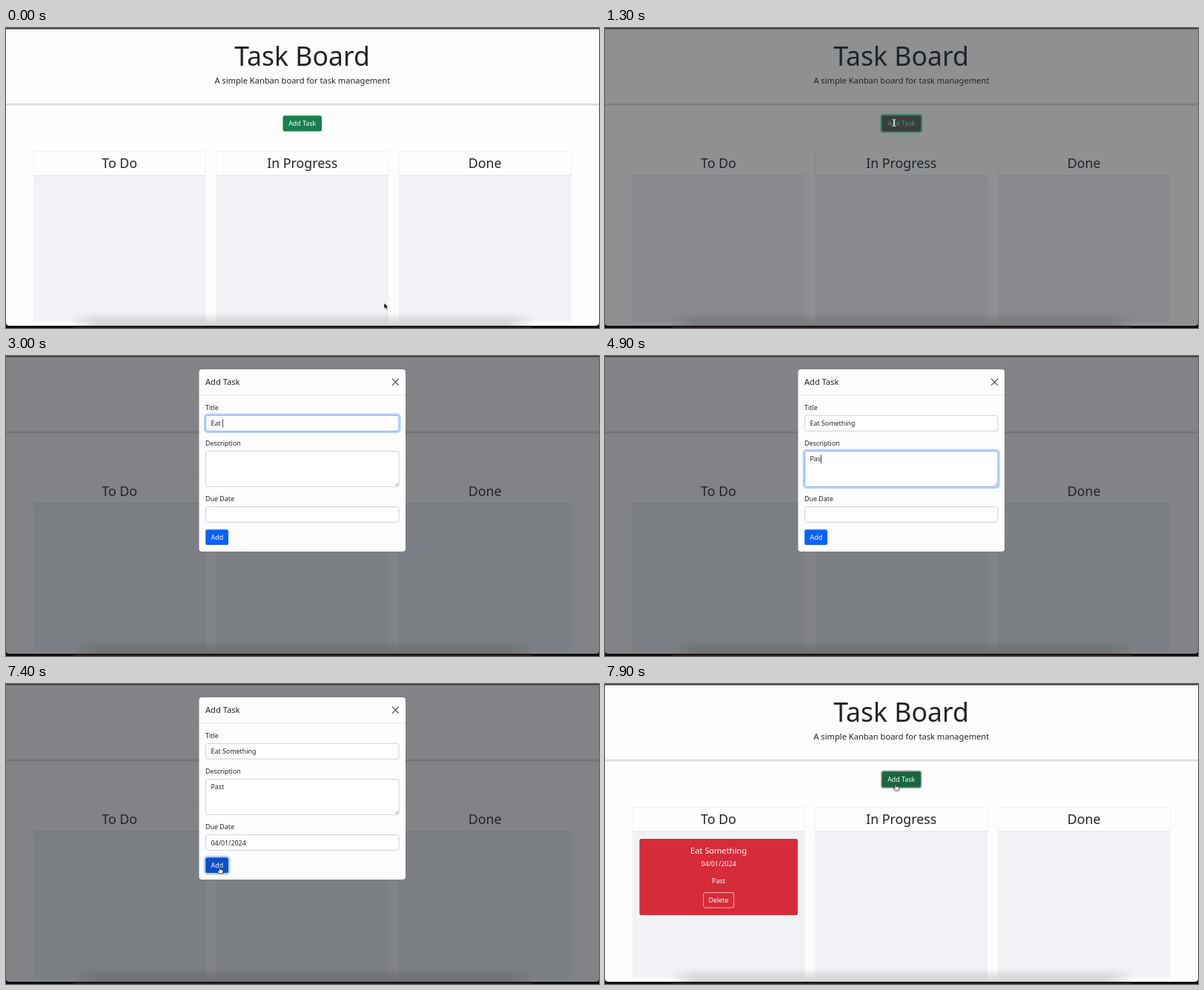
These frames come from a looping animation (800x405 px, 8 s). An HTML page:

```html
<!DOCTYPE html>
<html lang="en">
<head>
<meta charset="utf-8">
<title>Task Board</title>
<style>
  html, body { margin: 0; width: 100%; height: 100%; overflow: hidden; background: #0c0c0c; }
  svg { display: block; width: 800px; height: 405px; font-family: "Noto Sans", sans-serif; font-size: 8.9px; fill: #212529; }
  text { white-space: pre; }
  .mid { text-anchor: middle; }
  .light { fill: #fff; }
  .field { fill: #fff; stroke: #ced1d5; }
  .focused { stroke: #86b0fe; }
  .ring { fill: none; stroke: #0d6efd; stroke-opacity: .3; stroke-width: 2.4; }
  #calendar { font-family: "Liberation Sans", Arial, sans-serif; }
</style>
</head>
<body>
<svg id="stage" viewBox="0 0 800 405"></svg>
<script>
const LOOP = 8000, STEP = 100;
const stage = document.getElementById('stage');

const rect = (x, y, w, h, attrs = '') => `<rect x="${x}" y="${y}" width="${w}" height="${h}" ${attrs}/>`;
const label = (x, y, str, attrs = '') => `<text x="${x}" y="${y}" ${attrs}>${str}</text>`;
const centered = (x, y, str, size = 8.9, cls = '') => label(x, y, str, `class="mid ${cls}" style="font-size:${size}px"`);

const column = (x, name) =>
  rect(x, 166.5, 232.5, 230, 'fill="#f1f2f5"') +
  rect(x, 166.5, 232.5, 33, 'fill="#fdfdfd" stroke="#f1f1f2" stroke-width=".8"') +
  rect(x, 198.8, 232.5, .9, 'fill="#dcdee0"') +
  centered(x + 116.2, 188.5, name, 17.8);

const field = (name, y, h, title) =>
  label(269, y - 7.8, title) +
  `<g id="${name}">` +
  rect(268, y - 1.5, 263.5, h + 3, 'class="ring" rx="4"') +
  rect(269.5, y, 260.5, h, 'class="field" rx="3"') +
  label(276.5, y + 13.9, '') +
  rect(0, y + 5, .8, 11.5, 'class="caret" fill="#111"') + '</g>';

function calendarMarkup() {
  const rights = [291, 312, 332.5, 355.5, 376, 396, 416];
  const lefts = [272.5, 293.5, 316.5, 337.5, 359.5, 380.5, 399.8];
  const widths = [20, 21, 18, 20, 18.5, 18, 18];
  const heads = ['Su', 'Mo', 'Tu', 'We', 'Th', 'Fr', 'Sa'].map((d, i) =>
    label([282, 304, 325, 347, 368.5, 388.7, 408.7][i], 262.3, d, 'class="mid" font-weight="bold"')).join('');
  let days = '';
  for (let day = 1; day <= 30; day++) {
    const col = day % 7, y = 272 + Math.floor(day / 7) * 17.6;
    const look = day === 2 ? 'fill="#fbe483" stroke="#dac254" stroke-dasharray="1.5 1"' : 'fill="#e7e7e7" stroke="#c6c6c6"';
    days += rect(lefts[col], y, widths[col], 15.8, look + ' stroke-width=".8"') +
      label(rights[col], y + 11.2, day, 'text-anchor="end" fill="#444"');
  }
  return rect(269.5, 225.5, 151.5, 136.5, 'fill="#f0f0f0" stroke="#c2c2c2" rx="1.5"') +
    rect(271.5, 227.8, 147, 20.2, 'fill="#e4e4e4" stroke="#d3d3d3" stroke-width=".8" rx="1.5"') +
    [281, 409].map(x => `<circle cx="${x}" cy="237" r="4.2" fill="#333b47"/>`).join('') +
    '<path d="M282 235l-2.5 2 2.5 2z" fill="#fff"/>' +
    [298.5, 347].map((x, i) => rect(x, 231.5, 45, 11.5, 'fill="#fff" stroke="#888" stroke-width=".8"') +
      label(x + 2.5, 240.8, ['Apr', '2024'][i], 'fill="#222"')).join('') + heads + days;
}

stage.innerHTML = `
<defs><linearGradient id="fade" x2="0" y2="1">
  <stop offset="0" stop-color="#000" stop-opacity="0"/><stop offset="1" stop-color="#000" stop-opacity=".17"/>
</linearGradient>
<linearGradient id="sides"><stop offset="0" stop-color="#000"/><stop offset=".06" stop-color="#fff"/>
  <stop offset=".94" stop-color="#fff"/><stop offset="1" stop-color="#000"/></linearGradient>
<mask id="dockMask">${rect(85, 380, 630, 25, 'fill="url(#sides)"')}</mask></defs>
${rect(0, 0, 800, 405, 'fill="#0c0c0c"')}
${rect(90, 403, 620, 2, 'fill="#2a1d20" rx="2"')}
${rect(0, 0, 800, 1.4, 'fill="#333335"')}
<path d="M0 1.4H800V398Q800 402 795 402H5Q0 402 0 398Z" fill="#fdfdfd"/>
${centered(399.5, 50.5, 'Task Board', 35.6)}
${centered(399.8, 75, 'A simple Kanban board for task management', 11.11)}
${rect(0, 101.8, 800, 2.6, 'fill="#d9d9da"')}
<g id="addTask">${rect(372, 116.5, 55.5, 24.5, 'rx="4" fill="#777" opacity=".6" class="glow"')}
${rect(373.5, 118.2, 52.5, 21.2, 'rx="2.6" class="face"')}
${centered(399.7, 132, 'Add Task', 8.9, 'light')}</g>
${column(37, 'To Do')}${column(283.5, 'In Progress')}${column(530, 'Done')}
<g id="card">${rect(46.5, 209, 213.5, 103, 'rx="2.5" fill="#d62b39"')}
${centered(153.2, 229, 'Eat Something', 11.11, 'light')}${centered(153.2, 246.3, '04/01/2024', 8.9, 'light')}
${centered(153.2, 268.7, 'Past', 8.9, 'light')}
${rect(132.8, 281.6, 41, 20.4, 'rx="2.5" fill="none" stroke="#f6d9dc" stroke-width=".8"')}
${centered(153.2, 295.2, 'Delete', 8.9, 'light')}</g>
${rect(85, 383, 630, 19, 'fill="url(#fade)" mask="url(#dockMask)"')}
${rect(0, 1.4, 800, 400.6, 'id="backdrop"')}
<g id="dimButton">${rect(372.5, 117.5, 54.5, 22.8, 'rx="3" fill="#3b3d3c" stroke="#2c8657" stroke-width="1.8"')}
${centered(399.7, 132, 'Add Task', 8.9)}</g>
<g id="modal">${rect(260.5, 18, 278.5, 246, 'rx="4" fill="#fdfdfd"')}
${rect(260.5, 52.3, 278.5, .8, 'fill="#dcdfe2"')}
${label(269, 39.2, 'Add Task', 'style="font-size:11.11px"')}
<path d="M521.3 31l8.4 8.4m0-8.4l-8.4 8.4" stroke="#555" stroke-width="1.2" stroke-linecap="round"/>
${field('titleField', 80.3, 21, 'Title')}
${field('noteField', 128.4, 48, 'Description')}
<path d="M525.3 175.2l3.8-3.8m-1.5 3.8l1.5-1.5" stroke="#666" stroke-width=".7"/>
${field('dateField', 203.6, 20.8, 'Due Date')}
${rect(268, 233, 33.3, 23.2, 'id="addRing" class="ring" rx="4"')}
${rect(269.2, 234.2, 30.8, 20.8, 'id="addFace" rx="2.6"')}
${centered(284.8, 247.7, 'Add', 8.9, 'light')}</g>
<g id="calendar">${calendarMarkup()}</g>
<g id="tip"><path d="M331.5 230l5.5-4.5 5.5 4.5z" fill="#161616"/>
${rect(324.3, 229.5, 87.7, 25, 'rx="4" fill="#161616"')}${label(331.5, 245.5, '04/02/2024', 'class="light" style="font-size:8.3px"')}</g>
<g id="pointer">
<path id="arrow" d="M0 0v8.2l1.9-1.7 1.3 2.9 1.5-.7-1.3-2.7h2.5z" fill="#000" stroke="#fff" stroke-width=".7"/>
<path id="hand" d="M-.8 0q.8-.9 1.6 0v3.2l3.4.8q1 .4.8 1.6l-.8 3.4h-4.8l-2.4-3.3q-.1-1.2 1.1-.8l1.1 1z" fill="#fff" stroke="#111" stroke-width=".8"/>
<g id="beam" fill="none"><path class="halo" stroke-width="2.2"/><path class="core" stroke-width="1"/></g></g>`;

const $ = id => document.getElementById(id);
document.querySelectorAll('#beam path').forEach(p =>
  p.setAttribute('d', 'M-2.2-4.5Q0-4.5 0-3V3Q0 4.5-2.2 4.5M2.2-4.5Q0-4.5 0-3V3Q0 4.5 2.2 4.5'));

const clamp = v => Math.min(1, Math.max(0, v));
const ramp = (t, from, to) => clamp((t - from) / (to - from));
const smooth = v => v * v * (3 - 2 * v);
const within = (t, from, to) => t >= from && t < to;
const show = (id, opacity) => $(id).setAttribute('opacity', +opacity);

// [time, x, y]
const path = [[0, 510, 371], [100, 510, 371], [800, 390, 126], [1300, 390, 128], [1800, 299, 91],
  [3700, 299, 91], [4000, 297, 138], [5400, 297, 141], [5800, 284, 211], [6100, 284, 211], [6400, 306, 280],
  [6600, 306, 280], [7100, 288, 247], [7500, 288, 247], [7900, 392, 135]];
const pointers = [[0, 'arrow'], [800, 'hand'], [1200, 'beam'], [2500, ''], [3700, 'beam'], [4700, ''],
  [5500, 'beam'], [6200, 'hand'], [6700, 'arrow'], [6900, 'hand'], [7500, 'arrow'], [7800, 'hand']];
// [time, characters shown]
const titleKeys = [[2500, 1], [2600, 2], [2800, 3], [3000, 4], [3200, 5], [3300, 6], [3400, 8], [3500, 9],
  [3600, 10], [3700, 11], [3800, 12], [3900, 13]];
const noteKeys = [[4700, 1], [4800, 2], [4900, 3], [5100, 4]];
const latest = (table, t, none) => table.reduce((v, [at, value]) => t >= at ? value : v, none);

function place(t) {
  const next = path.findIndex(p => p[0] > t);
  if (next < 0) return path[path.length - 1].slice(1);
  const [a, b] = [path[next - 1], path[next]], k = smooth(ramp(t, a[0], b[0]));
  return [a[1] + (b[1] - a[1]) * k, a[2] + (b[2] - a[2]) * k];
}

function setField(name, value, focus, caret) {
  const box = $(name), text = box.querySelector('text'), bar = box.querySelector('.caret');
  text.textContent = value;
  box.querySelector('.ring').setAttribute('opacity', focus);
  box.querySelector('.field').classList.toggle('focused', focus > .5);
  bar.setAttribute('opacity', +caret);
  bar.setAttribute('x', 276.5 + (value ? text.getComputedTextLength() : 0));
}

function draw(t) {
  const dim = ramp(t, 1000, 1200) * (1 - ramp(t, 7700, 7900));
  const open = ramp(t, 1300, 1700) * (1 - ramp(t, 7400, 7700));
  $('backdrop').setAttribute('opacity', dim * (.5 + .06 * open));
  show('dimButton', t < 2000 ? dim : 0);
  show('modal', open);
  $('modal').setAttribute('transform', `translate(0 ${-28 * (1 - smooth(open))})`);
  show('card', t >= 7500);

  const pressed = t >= 7700 || within(t, 1000, 7000), hover = t >= 800;
  const button = $('addTask');
  button.querySelector('.face').setAttribute('fill', pressed ? '#17663f' : hover ? '#157347' : '#187f4d');
  button.querySelector('.glow').setAttribute('opacity', pressed ? .6 : 0);

  setField('titleField', 'Eat Something'.slice(0, latest(titleKeys, t, 0)),
    ramp(t, 1900, 2100) * (1 - ramp(t, 4100, 4300)), within(t, 2000, 4100));
  setField('noteField', 'Past'.slice(0, latest(noteKeys, t, 0)),
    ramp(t, 4100, 4300) * (1 - ramp(t, 5700, 5900)), within(t, 4200, 4500) || within(t, 4700, 5300));
  setField('dateField', t >= 6500 ? '04/01/2024' : '',
    ramp(t, 5700, 5900) * (1 - ramp(t, 6500, 6700)), within(t, 5800, 6300));

  show('calendar', .92 * ramp(t, 5700, 6000) * (1 - ramp(t, 6500, 6800)) + .08 * within(t, 6100, 6500));
  show('tip', within(t, 5900, 6300));
  show('addRing', within(t, 7300, 7800));
  $('addFace').setAttribute('fill', t >= 7300 ? '#0b4fc6' : t >= 6900 ? '#0b5ed7' : '#0962fd');

  const [x, y] = place(t), kind = latest(pointers, t);
  $('pointer').setAttribute('transform', `translate(${x} ${y})`);
  for (const id of ['arrow', 'hand', 'beam']) show(id, id === kind);
  const onDark = t < 1600;
  $('beam').children[0].setAttribute('stroke', onDark ? '#555' : '#fff');
  $('beam').children[1].setAttribute('stroke', onDark ? '#eee' : '#111');
  $('dimButton').querySelector('text').setAttribute('fill', '#3f9a6b');
}

function tick() {
  draw(Math.floor(performance.now() % LOOP / STEP) * STEP);
  requestAnimationFrame(tick);
}
tick();
</script>
</body>
</html>
```
